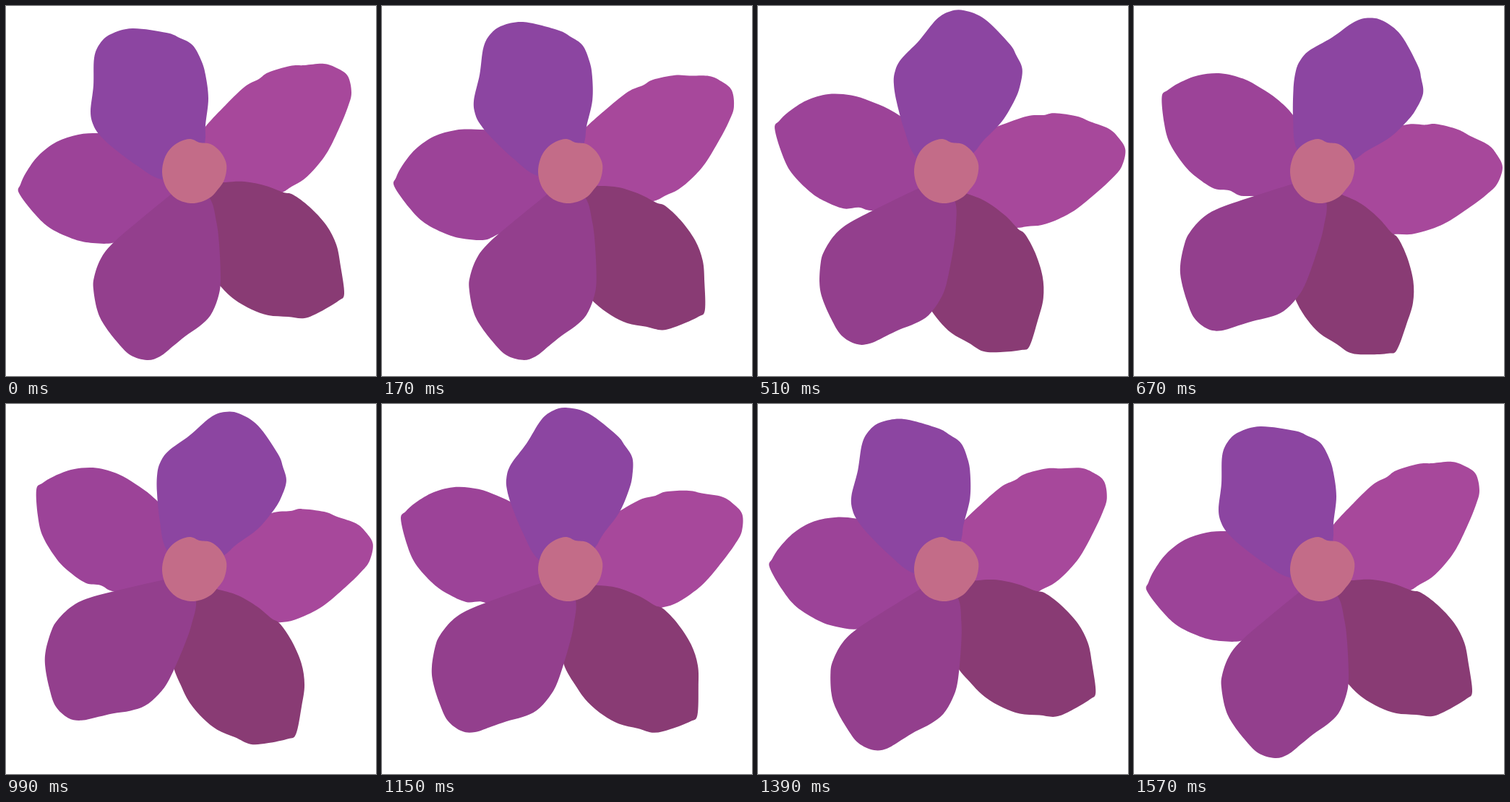
Animation of 512 by 512 pixels, one loop 1.6 s. Source, as an HTML page with a canvas:

```html
<!DOCTYPE html>
<html lang="en">
<head>
<meta charset="utf-8">
<title>Flower</title>
<style>
html, body { margin: 0; height: 100%; overflow: hidden; background: #fff; }
canvas { display: block; width: 100vw; height: 100vh; }
</style>
</head>
<body>
<canvas id="stage" width="512" height="512"></canvas>
<script>
const ctx = document.getElementById('stage').getContext('2d');
const LOOP = 1600, STEPS = 40;

// Pose keys: time in ms and the drawing step reached at that time.
const keyTimes = [0, 30, 290, 510, 670, 990, 1270, 1570];
const keySteps = [0, 1, 8, 13, 17, 25, 32, STEPS];
const poseSteps = [0, 8, 13, 17, 25, 32];

// Closed smooth outline through "x,y x,y ..." (Catmull-Rom).
function outline(text) {
  const pts = text.split(' ').map(p => p.split(',').map(Number));
  const at = i => pts[(i + pts.length) % pts.length];
  const path = new Path2D();
  path.moveTo(...pts[0]);
  pts.forEach((b, i) => {
    const a = at(i - 1), c = at(i + 1), d = at(i + 2);
    path.bezierCurveTo(
      b[0] + (c[0] - a[0]) / 6, b[1] + (c[1] - a[1]) / 6,
      c[0] - (d[0] - b[0]) / 6, c[1] - (d[1] - b[1]) / 6, ...c);
  });
  path.closePath();
  return path;
}

// Back to front; angles are degrees at poseSteps.
const petals = [
  { color: '#a7489b', angles: [0, 13.7, 25, 30.6, 23.8, 7.2],
    path: outline('260,228 264,186 276,167 300,141 330,112 350,101 363,92 393,83 413,82 440,80 458,86 473,97 478,120 473,140 462,167 446,200 430,222 412,240 395,250 380,259 350,268 300,255') },
  { color: '#893b74', angles: [0, 15.7, 25.2, 28, 19, 3.5],
    path: outline('265,250 303,244 330,243 360,249 384,258 397,261 420,278 443,303 457,330 463,360 468,398 460,408 435,423 413,432 390,430 363,428 340,420 316,406 297,388 273,358 258,310') },
  { color: '#9c4398', angles: [0, 9.1, 21.2, 32.1, 34, 15],
    path: outline('260,228 225,205 185,184 155,177 127,176 100,178 70,188 45,207 28,230 20,247 18,259 40,288 62,308 95,323 120,328 147,328 166,319 187,315 225,285') },
  { color: '#933f8d', angles: [0, 4.1, 13.4, 21.8, 26.2, 13.6],
    path: outline('255,240 228,261 190,292 148,328 131,350 122,375 121,392 126,420 135,440 153,464 172,483 195,490 213,485 232,470 248,457 268,443 283,428 293,405 297,380 295,330 291,298 282,266') },
  { color: '#8c45a1', angles: [0, 19.1, 37.8, 53.6, 47.5, 17.1], pivotX: 263,
    path: outline('262,240 215,240 180,220 148,196 130,179 121,165 117,146 121,110 122,72 130,52 145,39 175,31 222,37 240,44 258,54 270,75 276,95 280,128 276,165 275,190') }
];
const center = outline('255,184 268,189 283,191 296,201 304,215 305,228 301,243 293,254 284,264 270,271 255,273 240,269 229,261 220,248 216,230 219,212 227,198 240,188');

function stepAt(ms) {
  if (ms >= keyTimes.at(-1)) return 0;
  const i = keyTimes.findIndex(t => t > ms) - 1;
  const u = (ms - keyTimes[i]) / (keyTimes[i + 1] - keyTimes[i]);
  return Math.floor(keySteps[i] + u * (keySteps[i + 1] - keySteps[i]) + 1e-6);
}

// Smooth periodic curve through the pose angles.
function angleAt(angles, step) {
  const n = poseSteps.length;
  const x = i => poseSteps[(i + n) % n] + STEPS * Math.floor(i / n);
  const y = i => angles[(i + n) % n];
  const rate = i => (y(i + 1) - y(i)) / (x(i + 1) - x(i));
  const slope = i => (rate(i - 1) * (x(i + 1) - x(i)) + rate(i) * (x(i) - x(i - 1))) / (x(i + 1) - x(i - 1));
  let i = n - 1;
  while (poseSteps[i] > step) i--;
  const h = x(i + 1) - x(i), u = (step - x(i)) / h, v = 1 - u;
  return v * v * (1 + 2 * u) * y(i) + u * u * (1 + 2 * v) * y(i + 1)
    + h * u * v * (v * slope(i) - u * slope(i + 1));
}

function draw() {
  const step = stepAt(performance.now() % LOOP);
  ctx.fillStyle = '#fff';
  ctx.fillRect(0, 0, 512, 512);
  for (const { color, angles, path, pivotX = 260 } of petals) {
    ctx.save();
    ctx.translate(pivotX, 228);
    ctx.rotate(angleAt(angles, step) * Math.PI / 180);
    ctx.translate(-pivotX, -228);
    ctx.fillStyle = color;
    ctx.fill(path);
    ctx.restore();
  }
  ctx.fillStyle = '#c36c88';
  ctx.fill(center);
  requestAnimationFrame(draw);
}
draw();
</script>
</body>
</html>
```
